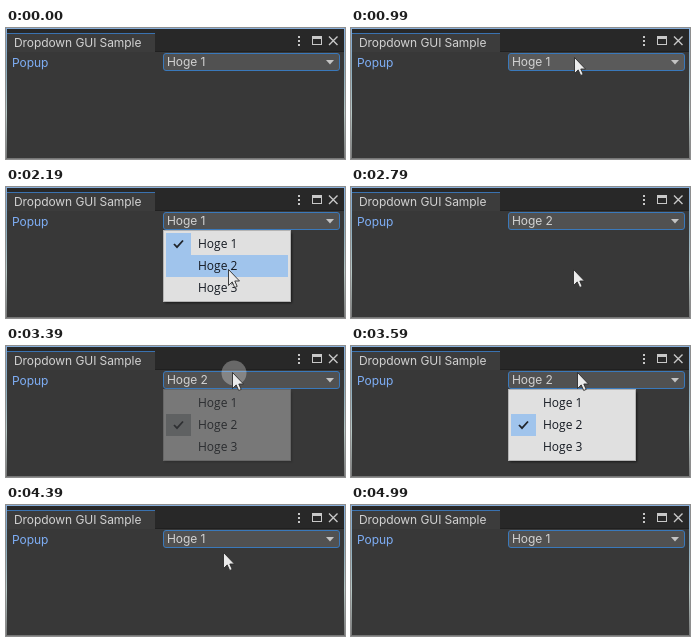
Animation, 339 px wide and 131 px high, one loop 5.79 s. Source, as an HTML page:

```html
<!DOCTYPE html>
<html lang="en">
<head>
<meta charset="utf-8">
<title>Dropdown GUI Sample</title>
<style>
  html, body { margin: 0; width: 100%; height: 100%; overflow: hidden; background: #383838; }
  svg { display: block; width: 100vw; height: 100vh; }
  text { font: 12px Inter, "Liberation Sans", sans-serif; letter-spacing: -.08px; fill: #d2d2d2; white-space: pre; }
  #menu text, #chosen text { font-family: "Open Sans", "Noto Sans", sans-serif; letter-spacing: 0; fill: #151a22; }
</style>
</head>
<body>
<svg viewBox="0 0 339 131">
  <defs>
    <linearGradient id="edge" x1="0" y1="0" x2="0" y2="1">
      <stop offset="0" stop-color="#86aedb"/>
      <stop offset=".3" stop-color="#88aabd"/>
      <stop offset=".65" stop-color="#b4c6c4"/>
      <stop offset="1" stop-color="#757575"/>
    </linearGradient>
    <filter id="blur" x="-10%" y="-10%" width="120%" height="120%">
      <feGaussianBlur stdDeviation="1"/>
    </filter>
  </defs>

  <!-- window -->
  <rect width="339" height="131" fill="url(#edge)"/>
  <rect x="1" y="1" width="337" height="129" fill="#383838"/>
  <rect x="1" y="1" width="337" height="22" fill="#282828"/>
  <rect x="1" y="23" width="337" height="1" fill="#202020"/>
  <path d="M1 24V5H149V24Z" fill="#3c3c3c"/>
  <rect x="1" y="5" width="148" height="1" fill="#3a72b0"/>
  <text x="8" y="19">Dropdown GUI Sample</text>
  <g fill="#c8c8c8">
    <rect x="292" y="8" width="2" height="2"/>
    <rect x="292" y="12" width="2" height="2"/>
    <rect x="292" y="16" width="2" height="2"/>
    <path d="M306 8H316V17H306ZM307 11V16H315V11Z" fill-rule="evenodd"/>
  </g>
  <path d="M323 8.5L331.5 17M331.5 8.5L323 17" stroke="#c8c8c8" stroke-width="1.4"/>

  <!-- field -->
  <text x="6" y="39" style="fill:#7eaef5">Popup</text>
  <rect id="field" x="157.5" y="25.5" width="176" height="17" rx="2.5" stroke="#3a79bb"/>
  <text id="value" x="161" y="38"></text>
  <path d="M320 32H328L324 36.5Z" fill="#c4c4c4"/>

  <!-- menu -->
  <g id="menu">
    <rect x="159" y="46" width="127" height="70" fill="#000" opacity=".55" filter="url(#blur)"/>
    <rect x="157.5" y="43.5" width="127" height="71" fill="#e0e0e0" stroke="#b4b4b4"/>
    <rect id="hover" x="160" width="122" height="22" fill="#a0c4ec"/>
    <g id="check">
      <rect id="cell" x="160" width="25" height="22"/>
      <path d="M168 11L171 14.2L177 7.5" fill="none" stroke="#20242a" stroke-width="1.8"/>
    </g>
    <g id="items"></g>
  </g>
  <g id="chosen">
    <rect x="160" width="122" height="22" fill="#a0c4ec"/>
    <text x="192" y="15"></text>
  </g>

  <circle id="press" cx="228" cy="27" r="12.5" fill="#fff" opacity=".3"/>
  <path id="cursor" d="M.5 .5V16.5L4.2 12.9L6.7 18.5L9.2 17.4L6.8 12H11.5Z"
        fill="#ebebeb" stroke="#2c2c2c" stroke-width=".9" stroke-linejoin="round"/>
</svg>
<script>
  const LOOP = 5790;
  const $ = id => document.getElementById(id);
  const label = i => "Hoge " + (i + 1);
  const rowY = i => 46 + 22 * i;

  // Each track lists [start time, value]; values hold until the next start.
  const cursorTrack = [
    [0, null], [590, [238, 68]], [790, [224, 35]], [990, [223, 29]],
    [1790, [223, 31]], [1990, [222, 80]], [2190, [222, 82]],
    [2990, [223, 60]], [3190, [226, 40]], [3390, [226, 26]],
    [3790, [217, 47]], [4790, [222, 57]], [4990, null]
  ];
  const fieldTrack = [[0, "#515151"], [390, "#5a5a5a"], [1390, "#515151"]];
  const valueTrack = [[0, 0], [2390, 1], [3990, 0]];
  const menuTrack = [[0, 0], [1390, .38], [1590, 1], [2390, 0], [3390, .38], [3590, 1], [3990, 0]];
  const hoverTrack = [[0, null], [1990, 1], [2390, null], [3790, 0], [3990, null]];
  const chosenTrack = [[0, 0], [2390, .83], [2590, .4], [2790, 0], [3990, .83], [4190, .4], [4390, 0]];
  const pressTrack = [[0, false], [3390, true], [3590, false]];

  function at(track, t) {
    let value;
    for (const [start, v] of track) if (t >= start) value = v;
    return value;
  }

  function show(el, on) {
    el.setAttribute("visibility", on ? "visible" : "hidden");
  }

  function place(el, x, y) {
    el.setAttribute("transform", `translate(${x} ${y})`);
  }

  for (let i = 0; i < 3; i++) {
    const item = document.createElementNS("http://www.w3.org/2000/svg", "text");
    item.setAttribute("x", 192);
    item.setAttribute("y", rowY(i) + 15);
    item.textContent = label(i);
    $("items").append(item);
  }

  function draw(t) {
    const value = at(valueTrack, t);
    $("value").textContent = label(value);
    $("field").setAttribute("fill", at(fieldTrack, t));

    const opacity = at(menuTrack, t);
    $("menu").setAttribute("opacity", opacity);
    place($("check"), 0, rowY(value));
    $("cell").setAttribute("fill", opacity < 1 ? "#a0a4a8" : "#a0c4ec");

    const hover = at(hoverTrack, t);
    show($("hover"), hover !== null);
    $("hover").setAttribute("y", rowY(hover ?? 0));

    $("chosen").setAttribute("opacity", at(chosenTrack, t));
    place($("chosen"), 0, rowY(value));
    $("chosen").lastElementChild.textContent = label(value);

    show($("press"), at(pressTrack, t));
    const pos = at(cursorTrack, t);
    show($("cursor"), pos !== null);
    if (pos) place($("cursor"), ...pos);
  }

  const begin = performance.now();
  function tick() {
    draw((performance.now() - begin) % LOOP);
    requestAnimationFrame(tick);
  }
  tick();
</script>
</body>
</html>
```
